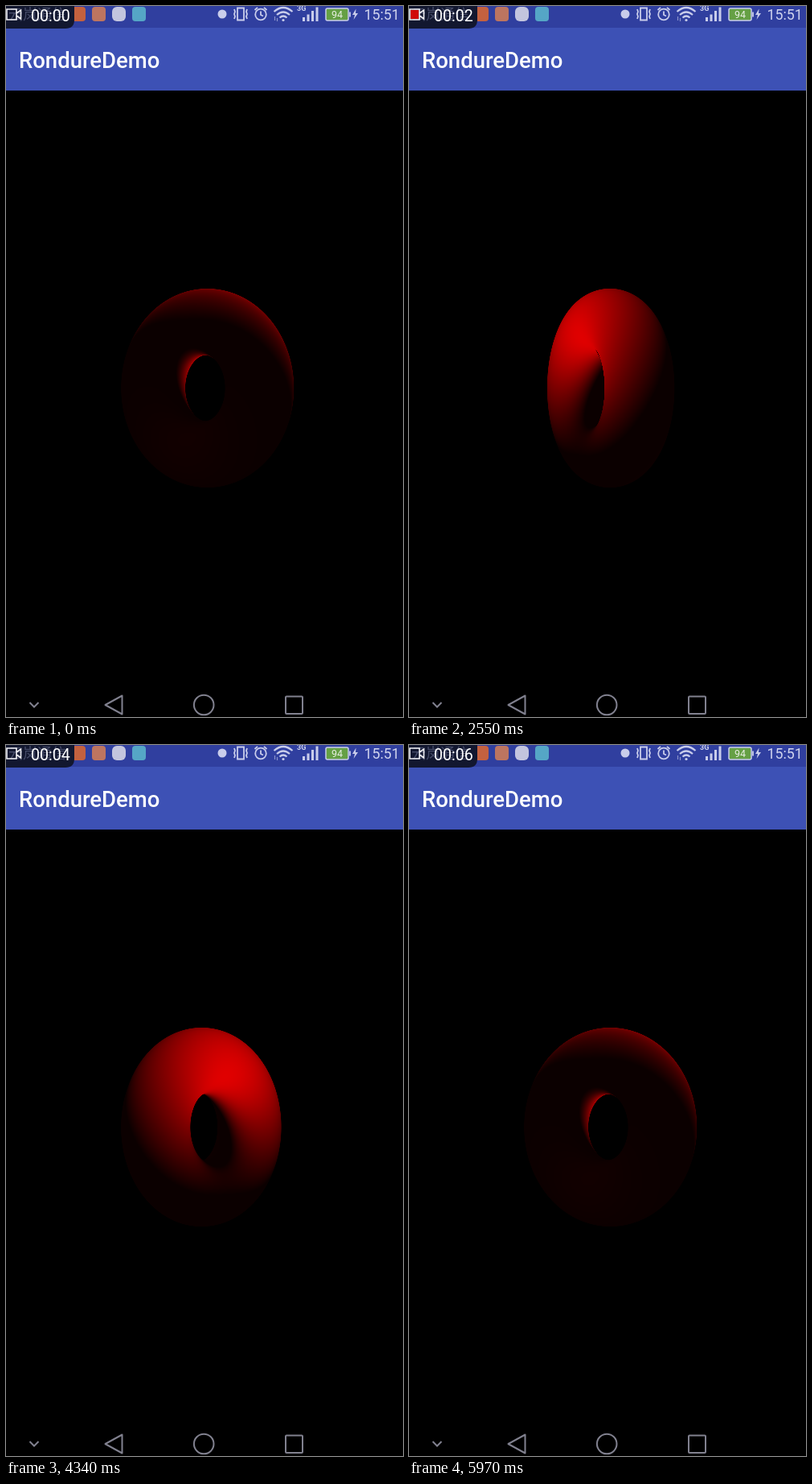
Animation of 494 by 883 pixels, one loop 6050 ms. Source, as an HTML page with a canvas:

```html
<!DOCTYPE html>
<html lang="en">
<head>
<meta charset="utf-8">
<title>Rotating ring</title>
<style>
  html, body { margin: 0; width: 100%; height: 100%; overflow: hidden; background: #000; }
  svg, canvas { position: absolute; left: 0; top: 0; display: block; }
  #ring { left: 119px; top: 346px; }
  text { font-family: Roboto, "Noto Sans", sans-serif; }
  .cjk { font-family: "Noto Sans CJK SC", "Noto Sans CJK", sans-serif; }
</style>
</head>
<body>
<canvas id="ring" width="256" height="256"></canvas>
<svg width="494" height="883" viewBox="0 0 494 883" fill="none">
  <rect width="494" height="27" fill="#303f9f"/>
  <rect y="27" width="494" height="78" fill="#3d51b5"/>
  <text x="16" y="77" font-size="27.5" font-weight="500" fill="#fff">RondureDemo</text>

  <!-- notifications -->
  <rect x="82" y="1" width="17" height="18" rx="4" fill="#c4613f"/>
  <rect x="107" y="1" width="17" height="18" rx="4" fill="#bd7560"/>
  <rect x="132" y="1" width="17" height="18" rx="6" fill="#c3c5de"/>
  <rect x="157" y="1" width="17" height="18" rx="4" fill="#55a6c6"/>

  <!-- recorder badge -->
  <path d="M0 0H85V17Q85 28 74 28H0Z" fill="#12172f"/>
  <text class="cjk" x="3" y="17" font-size="18" fill="#6a7090" opacity=".6">云岚通信</text>
  <rect id="rec" x="2" y="5" width="10" height="11" fill="#d00808"/>
  <path d="M1 4H13V17H1Z M13 9L18.5 5V16L13 12" stroke="#f2f2f6" stroke-width="1.6"/>
  <text id="clock" x="31" y="18.5" font-size="19.6" fill="#fff">00:00</text>

  <!-- system status -->
  <g stroke="#c9cdeb" stroke-width="1.8">
    <circle cx="269" cy="10" r="5.5" fill="#c9cdeb" stroke="none"/>
    <path d="M288 2.5H296V17.5H288Z M284 4L285 7L284 10L285 13L284 16 M300 4L299 7L300 10L299 13L300 16"/>
    <circle cx="317" cy="10.5" r="6.8"/>
    <path d="M317 6.5V11L320 12.5 M309.5 5L313 1.8 M324.5 5L321 1.8"/>
    <path d="M333.5 7Q345 -3 356.5 7 M337 11Q345 4 353 11 M340.5 14.5Q345 10.5 349.5 14.5" stroke-width="2.2"/>
    <circle cx="345" cy="17.5" r="1.6" fill="#c9cdeb" stroke="none"/>
    <path d="M334.5 13V18 M337.5 15V19" stroke-width="1.2" opacity=".6"/>
    <path d="M370.5 14V19 M376 10.5V19 M381.5 6V19 M387 1.5V19" stroke-width="3"/>
    <rect x="398" y="3" width="28" height="15" rx="2" fill="#65a044" stroke-width="1.5"/>
    <path d="M428 7.5V13.5"/>
    <path d="M435.5 3.5L431 11H434L432.5 17L438 9H435Z" fill="#c9cdeb" stroke="none"/>
  </g>
  <g fill="#d0d4ee">
    <text x="362" y="6" font-size="9" font-weight="700">3G</text>
    <text x="412" y="15" font-size="12.5" text-anchor="middle" fill="#e8efe2">94</text>
    <text x="445.5" y="17" font-size="17.8">15:51</text>
  </g>

  <!-- navigation -->
  <g stroke="#81818f" stroke-width="2">
    <path d="M29.5 865L35 870.5L40.5 865"/>
    <path d="M123.500 868L144.500 856.500V879.500Z" stroke-linejoin="round"/>
    <circle cx="246.2" cy="868" r="12.3"/>
    <rect x="348" y="857.5" width="21" height="21.5" rx="1"/>
  </g>
</svg>
<script>
const LOOP = 6050, TURN = 5970, START_ANGLE = 143.6;
const SIZE = 256, CENTER_Y = 128.5, MAJOR = 82, MINOR = 41, EYE = 1400;
const LIGHT_Y = 0.447, LIGHT_Z = 0.894;
const TICK_SLACK = 10;

// [first, last, count] of evenly spaced screen updates, in ms
const RUNS = [
  [0, 0, 1], [80, 640, 8], [690, 1230, 8], [1330, 1930, 9], [2010, 2550, 8], [2630, 3170, 8],
  [3250, 3810, 8], [3860, 4410, 8], [4510, 5110, 9], [5210, 5740, 8], [5840, 5970, 3]
];
const ticks = RUNS.flatMap(([a, b, n]) =>
  Array.from({ length: n }, (_, i) => a + (n > 1 ? (b - a) * i / (n - 1) : 0)));

const ctx = document.getElementById('ring').getContext('2d');
const image = ctx.createImageData(SIZE, SIZE);
const clock = document.getElementById('clock');
const rec = document.getElementById('rec');

for (let i = 3; i < image.data.length; i += 4) image.data[i] = 255;

// The surface is lit by its direction from the ring's centre; the light turns with the ring.
function shade(x, y, z) {
  const d = (y * LIGHT_Y + z * LIGHT_Z) / Math.sqrt(x * x + y * y + z * z);
  return d > 0 ? 11 + 255 * d : 11 + 14 * d ** 4;
}

// Marches one view ray in the ring's own space and returns its red value.
function trace(px, py, sin, cos) {
  const len = Math.sqrt(px * px + py * py + EYE * EYE);
  const vx = px / len, dy = py / len, vz = -EYE / len;
  const dx = vx * cos - vz * sin, dz = vx * sin + vz * cos;
  const ox = -EYE * sin, oz = EYE * cos;
  let t = EYE - 128, best = 9, bx = 0, by = 0, bz = 1;
  for (let i = 0; i < 60 && t < EYE + 135; i++) {
    const x = ox + dx * t, y = dy * t, z = oz + dz * t;
    const q = Math.sqrt(x * x + y * y) - MAJOR;
    const d = Math.sqrt(q * q + z * z) - MINOR;
    if (d < best) { best = d; bx = x; by = y; bz = z; }
    if (d < 0.04) break;
    t += d;
  }
  const cover = Math.min(1, Math.max(0, 1 - 2 * (best - 0.04)));
  return cover && cover * shade(bx, by, bz);
}

function drawRing(degrees) {
  const a = degrees * Math.PI / 180, sin = Math.sin(a), cos = Math.cos(a);
  for (let j = 0; j < SIZE; j++) {
    const y = CENTER_Y - j - 0.5;
    for (let i = 0; i < SIZE; i++) {
      const x = i + 0.5 - SIZE / 2;
      const near = x * x + y * y < 16000;
      image.data[(j * SIZE + i) * 4] = near ? trace(x, y, sin, cos) : 0;
    }
  }
  ctx.putImageData(image, 0, 0);
}

let shown = -1;
function render(time) {
  const index = ticks.findLastIndex(t => t <= time + TICK_SLACK);
  if (index === shown) return;
  shown = index;
  const t = ticks[index], recorded = t + 50;
  drawRing(START_ANGLE + t / TURN * 360);
  clock.textContent = '00:0' + Math.floor(recorded / 1000);
  rec.style.visibility = recorded % 1000 >= 400 ? 'visible' : 'hidden';
}

const begin = performance.now();
function loop() {
  render((performance.now() - begin) % LOOP);
  requestAnimationFrame(loop);
}
loop();
</script>
</body>
</html>
```
